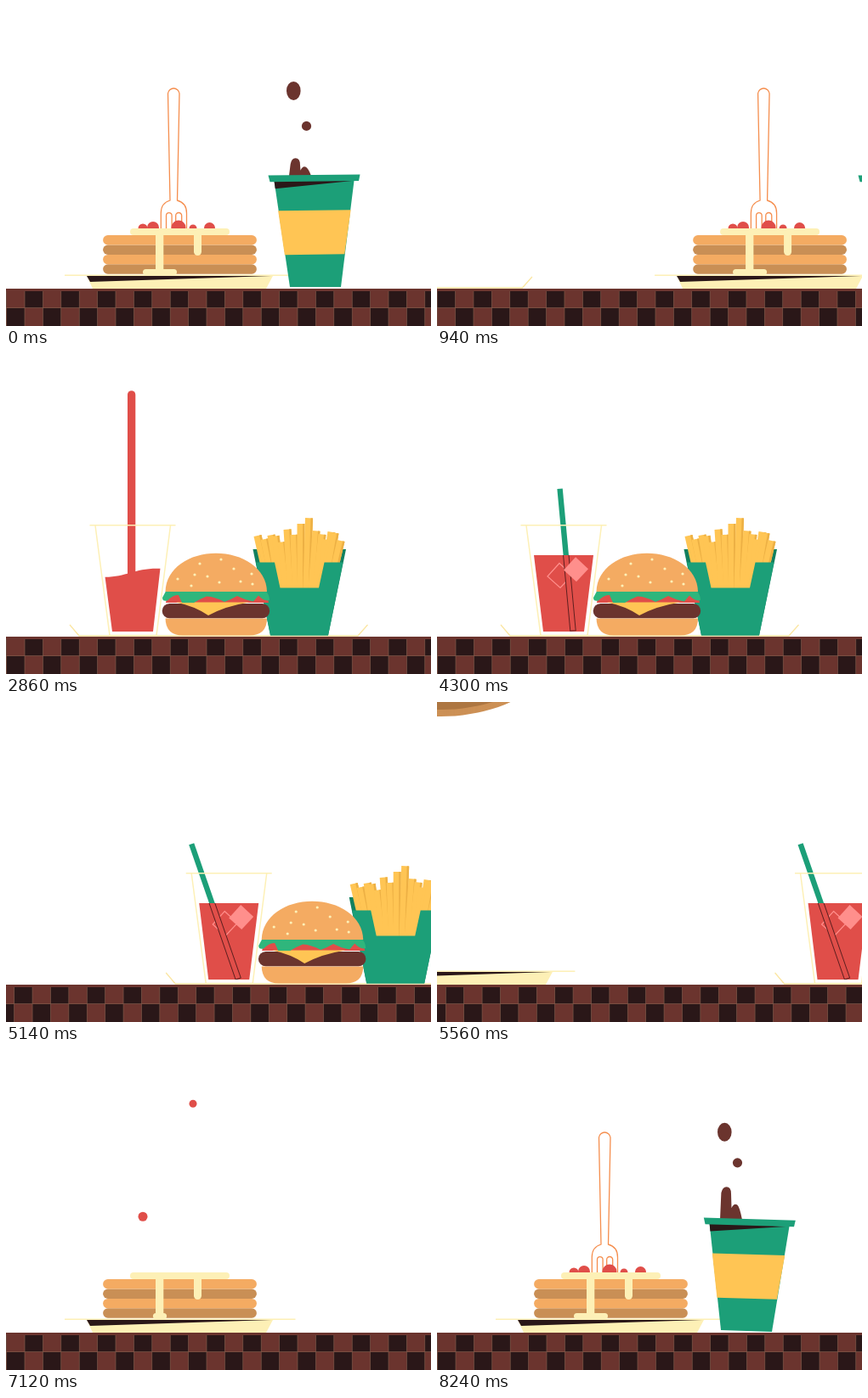
These frames come from a looping animation (500 by 377 pixels, 8260 ms). An HTML page with a canvas:

```html
<!DOCTYPE html>
<html lang="en">
<head>
<meta charset="utf-8">
<title>Diner belt</title>
<style>
html, body { margin: 0; height: 100%; overflow: hidden; background: #fff; }
canvas { display: block; }
</style>
</head>
<body>
<canvas id="stage" width="500" height="377"></canvas>
<script>
const g = document.getElementById('stage').getContext('2d');
const LOOP = 8260, SLIDE = 1452, FALL = 320;
const BROWN = '#6b342e', DARK = '#2a1718', CREAM = '#fdf0b6', TAN = '#c98f55', BUN = '#f4ab62',
  YELLOW = '#ffc554', GREEN = '#1c9f78', RED = '#e04e49', PINK = '#ff8f8c';

const clamp = v => Math.min(1, Math.max(0, v));
const ease = v => { v = clamp(v); return v * v * (3 - 2 * v); };

// Vertical offset of a part that falls and touches down at `land`
function drop(t, land, h = 380) {
  const u = (t - land) / FALL + 1;
  return u < 0 ? -999 : u < 1 ? -h * (1 - u * u) : 0;
}
function hop(t, land, height) {
  const u = (t - land) / 160;
  return u > 0 && u < 1 ? -height * Math.sin(Math.PI * u) : 0;
}

function fill(color, d) { g.fillStyle = color; g.fill(new Path2D(d)); }
function line(color, d, width = 1.3) {
  g.strokeStyle = color; g.lineWidth = width; g.stroke(new Path2D(d));
}
function oval(color, x, y, rx, ry = rx, rot = 0) {
  g.fillStyle = color;
  g.beginPath(); g.ellipse(x, y, rx, ry, rot, 0, 7); g.fill();
}
function pill(color, x, y, w, h, r = h / 2) {
  g.fillStyle = color;
  g.beginPath(); g.roundRect(x, y, w, h, r); g.fill();
}
function at(x, y, draw) { g.save(); g.translate(x, y); draw(); g.restore(); }
function disc(x, y, rx, ry, rot, depth, side, top) {
  for (let d = depth; d > 0; d--) oval(side, x, y + d, rx, ry, rot);
  oval(top, x, y, rx, ry, rot);
}

function floor(shift) {
  const cell = 21.4, x0 = (shift + 22) % (2 * cell) - 4 * cell;
  g.fillStyle = BROWN; g.fillRect(0, 333, 500, 44);
  for (let i = 0; i < 30; i++) {
    const x = x0 + i * cell;
    g.fillStyle = DARK;
    g.fillRect(x, i % 2 ? 356 : 336, cell, i % 2 ? 21 : 19.5);
    g.fillStyle = '#84604f';
    g.fillRect(x - 0.3, 336, 0.6, 41);
  }
  g.fillRect(0, 355.4, 500, 0.6);
}

// ---- breakfast ----
function pancake(t, i) {
  const land = 5780 + 180 * i, d = drop(t, land), y = 310 - 11.4 * i;
  const color = i % 2 ? BUN : TAN;
  if (d < -12) {
    const k = -d / 380;
    disc(204, y + d + 2, 91, Math.max(4, 42 * k), -0.135 * k, 8, i % 2 ? BUN : '#cc9055', i % 2 ? TAN : '#ad7641');
    return;
  }
  const lift = hop(t, land, 12), by = y + d + lift * 0.85;
  g.lineCap = 'round';
  line(color, `M119.8 ${by}Q204.5 ${by + lift / 3} 289.2 ${by}`, 11.4);
}

function fork() {
  line('#f58e4e', 'M182.3 262V244C182.3 236 186 231 193 229L190.5 103A6.8 6.8 0 0 1 204 103L201.5 229C209 231 212.5 236 212.5 244V262' +
    'M188.5 262V247a3.3 3.3 0 0 1 6.6 0V262M199.7 262V247a3.5 3.5 0 0 1 7 0V262');
}

function topping(t) {
  at(0, drop(t, 7680), fork);
  [[161, 262, 5.5], [173, 261, 7], [203, 261, 8.5], [220, 262, 4.5], [239.5, 261.5, 6.5]].forEach(([x, y, r], i) =>
    oval(RED, x, y + drop(t, 7150 + 70 * (i * 2 % 5)), r));
  const spread = ease((t - 6760) / 260), drip = ease((t - 6850) / 250);
  const head = 262 + drop(t, 6760), tail = drop(t, 7000, 270) + 262;
  if (head > 0 && t < 7000) {
    const top = Math.max(-10, tail);
    pill(CREAM, 192, top, 9, head - top + 4);
  }
  if (!spread) return;
  pill(CREAM, 204.5 - 58.5 * spread, 262, 117 * spread, 8, 4);
  if (!drip) return;
  pill(CREAM, 176, 264, 9.3, 6 + 44 * drip, 4.5);
  pill(CREAM, 221, 264, 9, 6 + 24 * drip, 4.5);
  const pool = ease((t - 7060) / 140);
  if (pool) pill(CREAM, 181 - 20 * pool, 310, 40 * pool, 7, 3.5);
}

function coffee(tau) {
  const h = 66 - 0.0056 * (tau + 90) ** 2;
  if (h > 0) {
    const y = 199 - h, low = 199 - h * 0.42;
    fill(BROWN, `M333 200L${335 - h / 60} ${y + 7}Q336 ${y} 340.5 ${y}Q346 ${y} 346 ${y + 8}L346.5 ${low + 3}` +
      `Q349 ${low - 3} 353 ${low - 1}Q356 ${low + 1} 359 200Z`);
  }
  const y1 = 96 + 0.003 * (tau + 35) ** 2, y2 = 121.7 + 0.003 * (tau + 80) ** 2;
  if (y1 < 212) oval(BROWN, 338.3, y1, 8.3, 11);
  if (y2 < 212) oval(BROWN, 353.5, y2, 5.6);
}

function cup(t) {
  const tau = t - LOOP, landed = tau > -200;
  if (landed) coffee(tau);
  const deg = landed ? -7 * Math.sin((tau + 1) * Math.PI / 200) * Math.exp(-tau / 300) : 0;
  at(364, 331.5 + drop(t, LOOP - 200), () => {
    g.rotate(deg * Math.PI / 180);
    g.translate(-364, -331.5);
    fill(GREEN, 'M316 206L410 206L394 331L334 331Z');
    fill(YELLOW, 'M320.5 241L406 240.5L398.5 292.5L328 293Z');
    fill(DARK, 'M316 206H410L317.2 215Z');
    fill(GREEN, 'M309 199.3L417 198.7L415.5 206.3L311 207Z');
  });
}

function breakfast(t) {
  fill(CREAM, 'M95 318H314L306 333H102Z');
  fill(DARK, 'M95 318H312L99 325Z');
  g.lineCap = 'butt';
  line(CREAM, 'M69 317.3H340.5', 1.6);
  const press = hop(t, 7670, 1) + hop(t, 7830, -0.3);
  at(204.5, 316, () => {
    g.scale(1 - 0.02 * press, 1 + 0.05 * press);
    g.translate(-204.5, -316);
    for (let i = 0; i < 4; i++) pancake(t, i);
    topping(t);
  });
  cup(t);
}

// ---- lunch ----
function cheese(d) {
  if (d > -4) return fill(YELLOW, 'M200 292.5Q222 297 238 308Q258 297 286 292.5Z');
  at(11, 308 + d, () => {
    g.scale(1, Math.min(1, 0.35 - d / 200));
    fill(YELLOW, 'M182 -27.5Q218 -26 231 -50Q256 -24 293.5 -20.5Q266 0 239 0Q205 0 182 -27.5Z');
  });
}

function tomato(d) {
  if (d > -4) return fill(RED, 'M190 283H307L309 293H188Z');
  const k = Math.min(1, -d / 202), rot = -0.13 * k, ry = 20 * k;
  const x = 247.5, y = 286.5 + d;
  disc(x, y, 60, ry, rot, 5, RED, '#f2625f');
  oval('#d9423f', x, y, 52, ry * 0.76, rot);
  g.lineCap = 'butt';
  line('#f2625f', `M${x - 53} ${y + 6 * k}L${x + 53} ${y - 7 * k}`, 4 * k);
  line('#f2625f', `M${x + 3} ${y - 17 * k}L${x - 4} ${y + 17 * k}`, 7);
}

function topBun() {
  fill(BUN, 'M187.5 280C188 252 216 234.7 247 234.7S306.5 252 307 280Z');
  [253, 242, 228, 247, 268, 253, 222, 260, 237, 262, 202, 265, 251, 269, 276, 268, 218, 273, 290, 271, 289, 259]
    .forEach((x, i, a) => { if (i % 2 === 0) oval(CREAM, x, a[i + 1], 1.6); });
}

function burger(t) {
  const bend = hop(t, 1590, 6.4);
  at(0, drop(t, 1470) + bend, () =>
    fill(BUN, `M187.5 311.5Q247 ${311.5 - bend / 4} 307 311.5Q307 331.5 286 331.5H208Q188 331.5 187.5 311.5Z`));
  pill(BROWN, 183.7, 294 + drop(t, 1590) + hop(t, 1590, 12.5), 126.5, 17.3);
  const c = drop(t, 1723), m = drop(t, 1761);
  tomato(m);
  cheese(c);
  at(0, drop(t, 1880) + hop(t, 1990, 4), () =>
    fill('#2fb67c', 'M188 279.5H306Q310 284 310 290Q304 292 297 284.5L291 291.5Q282 290 272 285Q265 289 257 292' +
      'Q246 286 236 285.5Q227 289 221 293H207L203 284Q197 283 190 290.5Q184 292 184 287Z'));
  at(0, drop(t, 1990) + hop(t, 1990, 8), topBun);
}

function fries(t) {
  const box = drop(t, 2450);
  at(0, box, () => fill('#12805f', 'M290.5 230H400L379 331.5H311Z'));
  const tops = [215, 219, 214, 215, 222, 207, 213, 200, 193, 208, 212, 218, 209, 210, 219];
  [291, 299, 307, 312, 319, 326, 334, 342, 351.5, 360, 367, 372, 378, 382, 389].forEach((x, i) => {
    const b = 342 + (x - 342) * 0.72, y = tops[i];
    at(0.5, drop(t, 2580 + 50 * (i * 4 % 5)), () => {
      const tilt = (342 - x) / 25;
      fill(YELLOW, `M${x} ${y}L${x + 9} ${y - tilt}L${b + 9} 277H${b}Z`);
      fill('#edb044', `M${x + 6.5} ${y - tilt * 0.7}L${x + 9} ${y - tilt}L${b + 9} 277H${b + 6.5}Z`);
    });
  });
  at(0, box, () => fill(GREEN, 'M294 245.5H316L322.5 275.5H368L374.5 245.5H396.5L379 331.5H311Z'));
}

function liquidPath(t) {
  const y = 327 - 90 * clamp((t - 2584) / 360);
  if (y > 326) return null;
  const s = t - 2860;
  let a = 5 * Math.cos(s / 90) * Math.exp(-Math.max(0, s) / 250);
  for (const hit of [3500, 3700]) if (t > hit) a += 3 * Math.sin((t - hit) / 70) * Math.exp((hit - t) / 120);
  a *= clamp((327 - y) / 30);
  const reach = (327 - y) * 11 / 90, l = 125 - reach, r = 173 + reach;
  return `M${l} ${y + a}C${l + 26} ${y + a} ${r - 30} ${y - a * 1.2} ${r} ${y - a}L173 327H125Z`;
}

function diamond(x, y, t, land, draw) {
  const d = drop(t, land), bob = t > land ? 7 * Math.sin((t - land) / 80) * Math.exp((land - t) / 160) : 0;
  at(x, y + d + bob, () => {
    g.rotate(d / 200 + bob / 40);
    draw('M-0.5 -14.5L14.5 -0.5L0.5 14.5L-14.5 1Z');
  });
}

function drink(t) {
  const lean = (2 + 17.1 * ease((t - 4231) / 250)) * Math.PI / 180;
  const inStraw = draw => at(160, 326 + drop(t, 4231, 350), () => { g.rotate(-lean); draw(); });
  inStraw(() => { g.fillStyle = GREEN; g.fillRect(-3.2, -168, 6.4, 168); });

  if (t > 2400 && t < 2960) {
    const head = t < 2584 ? 325 + drop(t, 2584) : 270 - 30 * clamp((t - 2860) / 90);
    const u = (t - 2835) / 110, tail = u < 0 ? -10 : -10 + 250 * clamp(u * 0.9);
    if (head > tail) pill(RED, 143, tail, 9.3, head - tail, 4.6);
  }
  const liquid = liquidPath(t);
  if (liquid) {
    fill(RED, liquid);
    diamond(144.5, 261, t, 3500, d => line(PINK, d, 1.2));
    g.save();
    g.clip(new Path2D(liquid));
    inStraw(() => {
      const shaft = 'M-3.2 -168V0H3.2V-168';
      fill(RED, shaft);
      line('#5e1f1f', shaft, 1);
    });
    g.restore();
    diamond(163.5, 253.5, t, 3700, d => fill(PINK, d));
  }
  g.lineCap = 'butt';
  at(0, drop(t, 2330), () => line(CREAM, 'M98.5 201.7H199.5M105 202L122 331.5H177L193.5 202', 1.5));
}

function lunch(t) {
  g.lineCap = 'butt';
  line('#fbe6a2', 'M75 319L86 332H414L425.5 319', 1.3);
  fries(t);
  drink(t);
  burger(t);
}

function render(t) {
  const p = ease((t - 338) / SLIDE), q = ease((t - 4694) / SLIDE);
  g.clearRect(0, 0, 500, 377);
  floor(513.6 * (p + q));
  if (p > 0 && q < 1) at(501 * (p + q - 1), 0, () => lunch(t));
  if (p < 1) at(500 * p, 0, () => breakfast(t + LOOP));
  else if (q > 0) at(500 * (q - 1), 0, () => breakfast(t));
}

const start = performance.now();
function tick() {
  render((performance.now() - start) % LOOP);
  requestAnimationFrame(tick);
}
tick();
</script>
</body>
</html>
```
